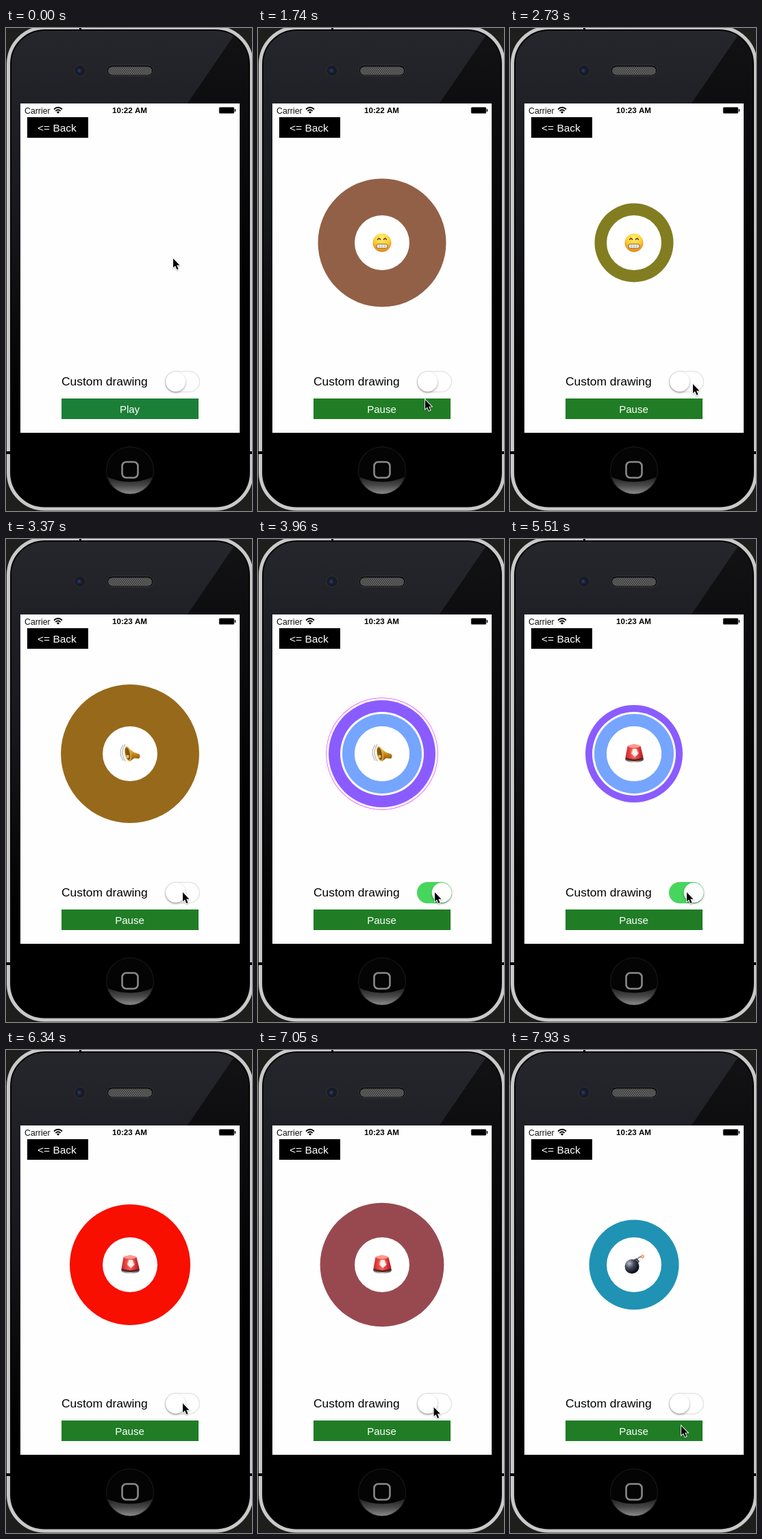
Write an HTML page with a canvas that moves like this. It is 359 px wide and 704 px high and loops after 7990 ms.

```html
<!DOCTYPE html>
<html lang="en">
<head>
<meta charset="utf-8">
<style>
html, body { margin: 0; width: 100%; height: 100%; overflow: hidden; background: #1e1f1d; }
canvas { display: block; }
</style>
</head>
<body>
<canvas id="stage" width="359" height="704"></canvas>
<script>
const ctx = document.getElementById('stage').getContext('2d');
const LOOP = 7990, PLAY_AT = 1040, SWITCH_ON = 3500, SWITCH_OFF = 5850, SLIDE = 260;
const ICON_TIME = 2050, BEAT = 410, SWING = 32;
const CX = 181, CY = 313, CORE = 40;
const SANS = '"Liberation Sans", Arial, sans-serif';

// Each row is a time followed by the values reached then.
const cursorPath = [
  [60, 244, 336], [420, 213, 430], [800, 237, 560], [1740, 244, 542],
  [2450, 267, 519], [2800, 267, 519], [3300, 258, 515], [6800, 258, 515], [7750, 250, 548]
];
const loudness = [
  [1040, 70], [1740, 93.5], [2730, 57.5], [3960, 81.7], [5510, 71], [6340, 88], [7930, 65.5]
];
const tints = [[1740, 146, 96, 70], [2730, 130, 125, 33], [6340, 248, 15, 0], [7930, 32, 146, 180]];

const clamp = v => Math.max(0, Math.min(1, v));
const ease = v => v * v * (3 - 2 * v);

function segment(keys, t) {
  const next = keys.findIndex(k => k[0] > t);
  const b = keys.at(next), a = next > 0 ? keys[next - 1] : b;
  const span = b[0] - a[0];
  return { a, b, span, p: span ? (t - a[0]) / span : 0 };
}

function sample(keys, t, curve = v => v) {
  const { a, b, p } = segment(keys, t);
  return a.slice(1).map((v, i) => v + (b[i + 1] - v) * curve(p));
}

// Whole beats swell between the key levels.
function ringRadius(t) {
  const { span, p } = segment(loudness, t);
  const beats = Math.round(span / BEAT);
  return sample(loudness, t)[0] + SWING * Math.sin(Math.PI * beats * p) ** 2;
}

function disc(x, y, r, fill) {
  ellipse(x, y, r, r, 0, fill);
}

function ellipse(x, y, rx, ry, turn, fill) {
  ctx.beginPath();
  ctx.ellipse(x, y, rx, ry, turn, 0, Math.PI * 2);
  ctx.fillStyle = fill;
  ctx.fill();
}

function rect(x, y, w, h, fill) {
  ctx.fillStyle = fill;
  ctx.fillRect(x, y, w, h);
}

function roundRect(x, y, w, h, r, fill, stroke, width = 1) {
  ctx.beginPath();
  ctx.roundRect(x, y, w, h, r);
  if (fill) { ctx.fillStyle = fill; ctx.fill(); }
  if (stroke) { ctx.strokeStyle = stroke; ctx.lineWidth = width; ctx.stroke(); }
}

function shape(path, fill) {
  ctx.fillStyle = fill;
  ctx.fill(new Path2D(path));
}

function line(path, color, width) {
  ctx.strokeStyle = color;
  ctx.lineWidth = width;
  ctx.stroke(new Path2D(path));
}

function clipped(makePath, paint) {
  ctx.save();
  ctx.beginPath();
  makePath();
  ctx.clip();
  paint();
  ctx.restore();
}

function withStops(gradient, colors) {
  colors.forEach((c, i) => gradient.addColorStop(i / (colors.length - 1), c));
  return gradient;
}
const linear = (x0, y0, x1, y1, ...colors) => withStops(ctx.createLinearGradient(x0, y0, x1, y1), colors);
const radial = (x, y, r, ...colors) => withStops(ctx.createRadialGradient(x, y, 0, x, y, r), colors);

function text(str, x, y, size, color, align = 'left', weight = 'normal') {
  ctx.font = `${weight} ${size}px ${SANS}`;
  ctx.textAlign = align;
  ctx.fillStyle = color;
  ctx.fillText(str, x, y);
}

function drawPhone() {
  rect(0, 0, 359, 704, '#1e1f1d');
  clipped(() => ctx.roundRect(3.5, -0.5, 355, 701.5, 53), () => {
    rect(0, 0, 359, 704, linear(0, 0, 0, 560, '#26272c', '#1e1f24', '#17181c', '#0b0b0d', '#000'));
    shape('M340 0H359V560H21V466Z', linear(0, 0, 0, 400, '#131315', '#09090b', '#000'));
  });
  roundRect(7, 3, 348, 694.5, 49.5, null, '#050505', 2);
  roundRect(3.5, -0.5, 355, 701.5, 53, null, '#c9c9c9', 5);
  rect(0, 617, 7, 4, '#000');
  rect(355, 617, 4, 4, '#000');
  rect(107, 0, 3, 2, '#000');

  disc(108, 62, 9, '#2b2c31');
  disc(108, 62, 7.5, '#1a1b20');
  disc(107.5, 62, 4.5, radial(107, 62, 4.5, '#2c4383', '#1d2a50', '#171920'));

  roundRect(147, 54, 68, 16, 8, '#0b0b0d', '#36373c');
  clipped(() => ctx.roundRect(149, 56.5, 64, 12, 6), () => {
    rect(148, 55, 67, 15, '#3c3c3c');
    for (let row = 0; row < 7; row++)
      for (let x = 148 + row % 2 * 1.5; x < 215; x += 3) rect(x, 56 + row * 2, 1.5, 1.2, '#858585');
  });

  disc(181, 645, 35, '#1b1b1c');
  disc(181, 645, 34, '#040404');
  clipped(() => ctx.arc(181, 645, 34, 0, Math.PI * 2), () =>
    shape('M145 653Q181 670 217 653V682H145Z', linear(0, 654, 0, 679, '#202020', '#484848', '#8a8a8a')));
  roundRect(169.5, 632.5, 23, 23, 6, null, '#898989', 2.6);
}

function drawScreen(t) {
  const playing = t >= PLAY_AT;
  rect(21, 110, 320, 480, '#fefefe');
  text('Carrier', 27, 124.5, 12.3, '#111');
  text(t < 2200 ? '10:22 AM' : '10:23 AM', 180.5, 124, 11.6, '#000', 'center', 'bold');
  line('M70 118.5Q76 113 82 118.5M72.3 121Q76 117.5 79.7 121', '#000', 1.7);
  shape('M76 124.7L73.8 122.4Q76 120.5 78.2 122.4Z', '#000');
  roundRect(311, 115.5, 22, 9, 1.5, '#000', '#777', .6);
  roundRect(333.7, 118, 1.5, 4, 1, '#000');

  rect(31, 130, 89, 30, '#000');
  text('<= Back', 46, 151, 15.5, '#fff');
  text('Custom drawing', 81, 521, 17.4, '#000');
  rect(81, 540, 200, 30, playing ? '#207d25' : '#1c7f38');
  text(playing ? 'Pause' : 'Play', 180.5, 560.5, 15, '#fff', 'center');
}

function drawSwitch(t) {
  const on = ease(clamp((t - SWITCH_ON) / SLIDE)) - ease(clamp((t - SWITCH_OFF) / SLIDE));
  roundRect(232.5, 500.5, 50, 30, 15, '#fefefe', '#e4e4e4', 1.4);
  ctx.globalAlpha = on;
  roundRect(232, 500, 51, 31, 15.5, '#46d65d');
  ctx.globalAlpha = 1;
  ctx.save();
  ctx.shadowColor = 'rgba(0,0,0,.35)';
  ctx.shadowBlur = 3;
  ctx.shadowOffsetY = 1.5;
  disc(247.5 + 20.7 * on, 515.5, 14.5, '#fff');
  ctx.restore();
}

function drawRings(t) {
  const radius = ringRadius(t);
  if (t >= SWITCH_ON + SLIDE / 2 && t < SWITCH_OFF) {
    for (let i = 4; i >= 0; i--) {
      const outer = 58 + 20 * i, inner = i ? outer - 17 : CORE;
      if (radius <= inner) continue;
      disc(CX, CY, Math.min(radius, outer), `hsl(${219 + 38 * i}, 100%, ${73 - 5 * i}%)`);
      disc(CX, CY, inner, '#fff');
    }
  } else {
    disc(CX, CY, radius, `rgb(${sample(tints, t).map(Math.round)})`);
  }
  disc(CX, CY, CORE, '#fff');
}

function drawGrin() {
  disc(181, 313, 13.5, radial(181, 306, 21, '#ffee70', '#ffd23a', '#dd7f18'));
  line('M174.5 309Q176.5 304 178.7 309M183.3 309Q185.5 304 187.5 309', '#5b3512', 1.6);
  roundRect(173, 315, 16, 6, 2.5, '#fff', '#8a5a1c', 1);
  line('M173 318H189M177 315V321M181 315V321M185 315V321', '#aaa298', .7);
}

function drawBell() {
  line('M171 300Q163 311 171 323M174 299Q166 311 174 324', '#888', .8);
  shape('M175 302L187 311L194.5 313.5Q197 317 194 320L187 319.5L181 324Z',
    linear(184, 303, 187, 323, '#f4cf5a', '#cc8c19', '#85520b'));
  ellipse(178, 313, 4.6, 11.3, -.22, '#e0b045');
  ellipse(177.7, 313, 3.2, 9.3, -.22, '#805515');
  disc(177.5, 317, 2.3, '#e5bd55');
}

function drawSiren() {
  ellipse(181.5, 321, 13.3, 5, 0, linear(168, 0, 195, 0, '#666', '#ddd', '#444'));
  ellipse(181.5, 319.5, 13.2, 4.4, 0, '#5c2727');
  shape('M168.5 318L171.5 302Q181 296.5 190.5 302L194.5 318Q181 324 168.5 318Z',
    linear(168, 0, 194, 0, '#c8252a', '#ff6055', '#b91623'));
  ellipse(181, 302, 9, 2.5, 0, '#ff9a91');
  disc(182, 311, 7, radial(182, 311, 7, '#fff', '#ffd0c5', 'rgba(255,90,80,0)'));
  shape('M179 306H185V311L188 312L182 318L177 312L179 311Z', '#fff0ee');
}

function drawBomb() {
  line('M184 308Q187 301 193 301', '#8b8c8e', 2);
  disc(193.5, 301, 3.2, radial(193.5, 301, 3.2, '#fff4a0', '#f49a67', 'rgba(240,80,40,0)'));
  disc(178, 315.5, 10.5, radial(174, 311, 14, '#b8bdc9', '#464b5a', '#10121a'));
  shape('M181 305.5L184.5 303.5L189 308L186.5 311Z', '#282b34');
  line('M183 305L187.5 309', '#7d8290', 1.2);
}

function drawCursor(t) {
  const arrow = 'M0 0V13.2L3 10.5L5.4 16L7.5 15.1L5.2 9.7H9.4Z';
  ctx.save();
  ctx.translate(...sample(cursorPath, t, ease));
  ctx.shadowColor = 'rgba(0,0,0,.3)';
  ctx.shadowBlur = 2;
  ctx.shadowOffsetY = 1;
  line(arrow, '#fff', 1.8);
  ctx.shadowColor = 'transparent';
  shape(arrow, '#000');
  ctx.restore();
}

const icons = [drawGrin, drawBell, drawSiren, drawBomb];

function draw(t) {
  drawPhone();
  drawScreen(t);
  drawSwitch(t);
  if (t >= PLAY_AT) {
    drawRings(t);
    icons[Math.floor((t - PLAY_AT) / ICON_TIME)]();
  }
  drawCursor(t);
}

let start;
function frame(now) {
  start ??= now;
  draw((now - start) % LOOP);
  requestAnimationFrame(frame);
}
draw(0);
requestAnimationFrame(frame);
</script>
</body>
</html>
```
